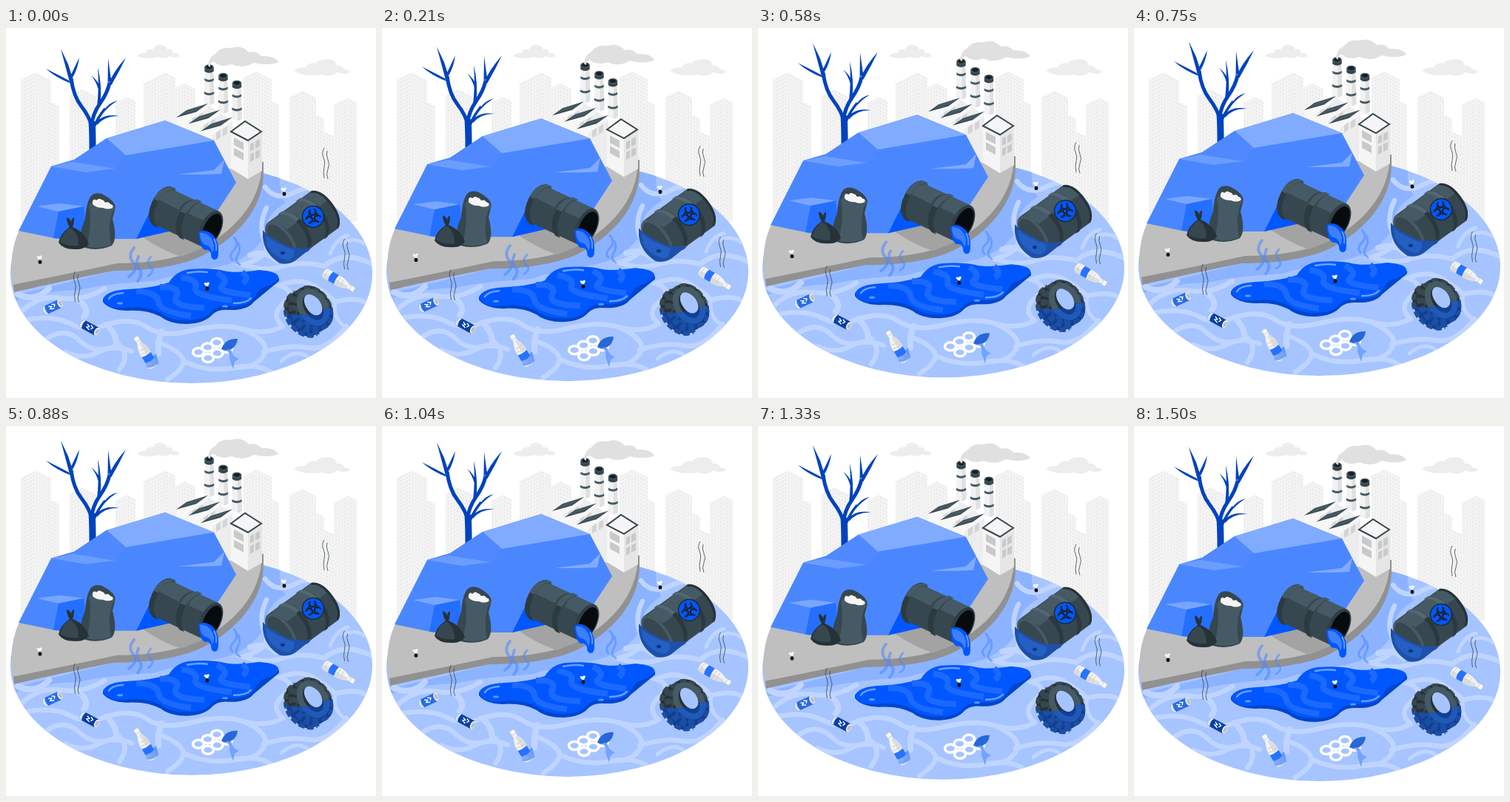
Write an HTML page that moves like this. It is 500 px wide and 500 px high and loops after 1.54 s.

```html
<!DOCTYPE html>
<html lang="en">
<head>
<meta charset="utf-8">
<title>Polluted shore</title>
<style>
html, body { margin: 0; width: 100%; height: 100%; overflow: hidden; background: #fff; }
svg { display: block; width: 100%; height: 100%; }
</style>
</head>
<body>
<svg viewBox="0 0 500 500" xmlns="http://www.w3.org/2000/svg">
<defs>
  <clipPath id="pond"><ellipse cx="250.5" cy="332" rx="244.5" ry="148"/></clipPath>
  <clipPath id="dip"><path d="M365 382Q395 392 415 385T450 376V430H365Z"/></clipPath>
  <pattern id="winL" width="4" height="5" patternUnits="userSpaceOnUse" patternTransform="skewY(-27)">
    <rect width="4" height="5" fill="#f5f5f5"/><rect x=".7" y="1" width="2.4" height="3" fill="#ebebeb"/>
  </pattern>
  <pattern id="winR" width="4" height="5" patternUnits="userSpaceOnUse" patternTransform="skewY(27)">
    <rect width="4" height="5" fill="#f5f5f5"/><rect x=".7" y="1" width="2.4" height="3" fill="#ebebeb"/>
  </pattern>
  <g id="fly">
    <ellipse cx="-3" cy="-2" rx="3.4" ry="1.7" transform="rotate(35)" fill="#f5f5f5"/>
    <ellipse cx="2.6" cy="-3" rx="3.2" ry="1.7" transform="rotate(-40)" fill="#f5f5f5"/>
    <ellipse cy="2.2" rx="2.4" ry="2.6" fill="#111"/>
  </g>
  <g id="bottle">
    <path d="M-20-7Q-24-7-24 0T-20 7H2Q10 6 14 3H21V-3H14Q10-6 2-7Z" fill="#f2f2f2"/>
    <path d="M-20 7H2Q10 6 14 3V0H-23Q-23 7-20 7Z" fill="#dedede"/>
    <path d="M-13-7H-4Q-6 0-4 7H-13Q-16 0-13-7Z" fill="#2672ff"/>
    <path d="M-19-6Q-22 0-19 6M0-6Q-2 0 0 6M5-5Q3 0 5 5" fill="none" stroke="#c8c8c8" stroke-width=".8"/>
    <rect x="18" y="-3.5" width="6" height="7" rx="1.5" fill="#fafafa" stroke="#c4c4c4" stroke-width=".8"/>
  </g>
  <g id="can">
    <path d="M-11-6H11Q14-4 14 0T11 6H-11Q-14 4-14 0T-11-6Z"/>
    <path d="M-9-6H-11Q-14-4-14 0T-11 6H-9Q-12 0-9-6Z" fill="#dce6fa"/>
    <ellipse cx="11" rx="3.2" ry="5.8" fill="#eee"/><ellipse cx="11.4" rx="2" ry="4" fill="#bdbdbd"/>
    <path d="M-5-3L-1-1L-4 1L1 3M0-4L4-2L2 1" fill="none" stroke="#fff" stroke-width="1.4"/>
  </g>
  <path id="wisp" d="M-2-21Q-6-14-3-8T-2 5T-2 20M2-17Q0-11 3-5T3 8T3 21" fill="none" stroke="#37474f" stroke-width=".8"/>
  <g id="stack">
    <path d="M-5.5 3H5.5L7 48Q0 53-7 48Z" fill="#f2f2f2"/>
    <path d="M1 3H5.5L7 48Q4 51 1 51Z" fill="#e0e0e0"/>
    <path d="M-6.2 15Q0 19 6.2 15V18Q0 22-6.2 18ZM-6.7 33Q0 37 6.7 33V36Q0 40-6.7 36Z" fill="#455a64"/>
    <path d="M-6.2 0V5.500Q0 10 6.2 5.500V0Z" fill="#37474f"/>
    <ellipse rx="6.2" ry="3.8" fill="#455a64"/><ellipse rx="4.3" ry="2.4" fill="#172026"/>
  </g>
  <g id="shed">
    <path d="M0 20L13 10L42 2V36L16 45L0 35Z" fill="#f7f7f7"/>
    <path d="M16 25L42 8V44L16 52Z" fill="#ededed"/>
    <path d="M0 20L14 10L43 1L27 12.500Z" fill="#37474f"/>
    <path d="M4 17.500L15 10.500L39 3L27 11Z" fill="#455a64"/>
    <path d="M21 22l6-4v10l-6 4zM30 17l6-4v10l-6 4z" fill="#d4d4d4"/>
  </g>
</defs>

<g id="city"></g>
<g fill="#ededed">
  <path d="M177 38Q181 33 188 34Q190 28 198 29Q203 21 210 23Q217 24 218 29Q225 28 226 34Q232 33 235 38Q228 41 222 38Q214 43 205 39Q192 44 177 38Z"/>
  <path d="M389 58Q397 52 405 54Q408 46 418 48Q426 41 436 42Q446 43 447 51Q455 50 457 56Q463 56 465 60Q458 64 447 60Q440 67 426 63Q402 66 389 58Z"/>
</g>

<g id="isle">
  <ellipse cx="250.5" cy="332" rx="244.5" ry="148" fill="#a6c4ff"/>
  <g clip-path="url(#pond)">
    <path d="M0 364Q80 345 146 328Q220 328 265 308Q345 262 348 190H372Q366 222 378 236Q348 254 352 277Q333 312 290 322Q240 330 200 342Q130 346 100 354Q55 354 0 372Z" fill="#8cb3ff"/>
    <g fill="none" stroke="#bfd5ff" stroke-width="6.500" stroke-linecap="round">
      <path d="M350 215Q365 235 390 222T442 225M352 243Q340 268 350 288T320 320Q350 330 374 322T430 322Q455 300 493 318"/>
      <path d="M20 384Q45 360 75 365T133 352M30 394Q65 388 88 400T135 401Q170 390 190 404T246 410Q290 398 320 407T374 403"/>
      <path d="M55 420Q80 403 100 423T153 428Q168 443 153 462M80 438Q105 449 125 438T170 437M205 425Q230 433 238 445T218 475M244 452Q275 466 310 459T364 470"/>
      <path d="M320 407Q360 425 348 443T310 458M348 438Q382 427 408 432T460 403M374 403Q356 388 375 372T370 348Q396 337 415 348T445 370Q478 362 490 374"/>
      <path d="M412 448Q394 431 372 450M445 370Q440 395 463 406M455 290Q472 282 485 292M438 305Q445 285 462 280" stroke-width="5"/>
      <path d="M95 365Q115 380 105 391M16 360Q40 371 58 352M210 410Q205 424 206 440M135 401Q150 413 149 430M330 307Q352 300 365 314" stroke-width="8"/>
    </g>
  </g>

  <path d="M7 320L11 357Q80 341 146 328C190 328 232 323 265 308C310 285 348 245 348 195V181L320 180Z" fill="#919191"/>
  <path d="M18 273Q3 305 9 347Q90 331 150 318C190 318 228 313 260 299C305 277 346 237 346 181L300 150L80 200Z" fill="#bfbfbf"/>
  <path d="M185 283Q210 300 236 309L262 299L280 285L230 265Z" fill="#a3a3a3"/>

  <use href="#stack" x="274.500" y="53"/>
  <use href="#stack" x="293.500" y="64.500"/>
  <use href="#stack" x="312" y="74.500"/>
  <path d="M273 51Q274 39 283 35Q290 25 304 27Q319 22 328 33Q338 30 345 38Q363 37 368 46Q354 52 335 47Q320 56 305 49Q290 54 281 46Q275 46 276 53Z" fill="#e0e0e0"/>
  <path d="M232 123L270 102L306 126V190H280Z" fill="#ededed"/>
  <use href="#shed" x="230" y="101"/>
  <use href="#shed" x="246.500" y="109.500"/>
  <use href="#shed" x="263" y="119.500"/>
  <path d="M304 141L327 153V204L304 190Z" fill="#f5f5f5"/>
  <path d="M327 153L346 141V193L327 204Z" fill="#e6e6e6"/>
  <path d="M304 140L323 126L345 140L327 152Z" fill="#f5f5f5" stroke="#37474f" stroke-width="2"/>
  <path d="M308 148l13 7v10l-13-7zM308 162l13 7v10l-13-7zM330 157l5-3v10l-5 3zM337 153l6-3v10l-6 3zM330 171l5-3v10l-5 3zM337 167l6-3v10l-6 3z" fill="#c9c9c9"/>

  <g fill="none" stroke="#0043bd" stroke-linejoin="bevel">
    <path d="M117 165Q117 142 116 126" stroke-width="9"/>
    <path d="M117 136Q113 120 102 106T88 68" stroke-width="5"/>
    <path d="M115 134Q117 116 127 102T140 74" stroke-width="5"/>
    <path d="M119 134Q124 121 134 109" stroke-width="3.500"/>
  </g>
  <path d="M86 73L74 28L84 49L91 71ZM89 73Q72 64 54 55Q67 67 88 75ZM88 63L99 40Q97 55 90 67ZM137.500 78Q144 60 162 40Q153 59 142.500 77ZM137.500 74L138 41L142 70ZM123 106Q126 80 124 53Q130 78 127.500 102ZM125 84Q122 72 115 64Q124 71 127 80ZM132 112Q138 101 151 98Q141 104 135 111ZM121 128Q132 115 153 119Q134 118 123 131Z" fill="#0043bd"/>

  <path d="M17 274L61 187L92 178L136 149L215 125L281 152L311 209L286 247L240 270L176 285L70 285Z" fill="#4a87ff"/>
  <path d="M61 187L92 178L136 149L162 172L147 191Z" fill="#5089ff"/>
  <path d="M136 149L215 125L281 152L162 172Z" fill="#80abff"/>
  <path d="M61 187L90 181L147 190L131 192L108 195Z" fill="#6b9dff"/>
  <path d="M42 241L72 237L105 241L71 248Z" fill="#78a6ff"/>
  <path d="M64 284L71 248L105 241L110 285Z" fill="#246fff"/>
  <path d="M233 198L281 192L295 178L291 197L268 198Z" fill="#80abff"/>
  <path d="M176 285L202 233L242 270Z" fill="#0057ff"/>

  <path d="M113 230Q117 221 129 224Q146 232 148 242L144 258Q151 285 143 294Q125 302 107 297Q95 285 107 258Q108 240 113 230Z" fill="#37474f"/>
  <path d="M119 231Q140 236 148 242L143 250Q137 272 142 293Q125 300 109 295Q117 260 112 240Z" fill="#455a64"/>
  <path d="M117 234Q119 230 122 233Q126 229 129 232Q132 232 134 236Q139 234 141 238Q146 239 144 243Q138 246 131 243Q121 243 117 238Z" fill="#f5f5f5"/>
  <path d="M82 256Q88 258 88 263Q88 258 92 256Q92 264 90 269Q107 276 112 292Q106 300 92 299Q77 299 71 290Q73 278 86 269Q82 263 82 256Z" fill="#263238"/>
  <path d="M85 271Q76 278 73 289Q84 296 98 294Q99 280 89 271Z" fill="#37474f"/>

  <g transform="translate(244 256) rotate(25)">
    <ellipse cx="-35" rx="16" ry="29" fill="#37474f"/>
    <path d="M36-26H-32V27H36Z" fill="#37474f"/>
    <path d="M-32-26H-2Q-13-20-14-5L-46-6Q-43-22-32-26ZM8-26H34L24-6H0Q0-20 8-26Z" fill="#455a64"/>
    <path d="M-35-29Q-51-25-51 0T-35 29H-29Q-44 22-44 0T-29-29Z" fill="#2d3a41"/>
    <path d="M3-28Q-11-22-11 0T3 29H10Q-3 20-3 0T10-28Z" fill="#2d3a41"/>
    <path d="M3-28Q-10-22-11-4H-3Q-1-22 10-28ZM-35-29Q-49-25-51-4H-44Q-42-24-29-29Z" fill="#455a64"/>
    <ellipse cx="36" rx="14" ry="26" fill="#2f3e46"/>
    <ellipse cx="37.500" rx="11" ry="22.500" fill="#080b0d"/>
  </g>
  <path d="M260 276Q270 270 281 281Q288 289 287 304Q287 313 282 313Q277 313 277 305Q275 299 269 300Q261 297 260 276Z" fill="#0057ff"/>
  <path d="M262 277Q272 275 279 287Q283 295 279 304Q276 293 269 293Q262 289 262 277Z" fill="#3d7fff"/>
  <path d="M281 285Q285 291 284 301" fill="none" stroke="#7aa8ff" stroke-width="1.500"/>

  <path d="M131 366V370Q139 381 163 382Q190 380 209 390Q221 400 245 400Q269 399 279 387Q287 380 300 381Q326 382 335 370L369 342V338Z" fill="#0045cc"/>
  <path d="M131 366Q137 354 166 353T220 344Q230 328 248 326Q278 324 294 328T342 327Q371 329 368 339Q362 347 346 351Q341 354 337 362Q331 376 306 376Q287 374 278 383Q269 395 245 395Q221 395 209 385Q190 375 163 378T131 366Z" fill="#0057ff"/>
  <g fill="none" stroke="#1c69ff" stroke-width="8">
    <path d="M176 356Q204 356 206 370T250 389M208 350Q237 349 230 363T268 378M237 337Q260 340 256 351T305 368M285 331Q302 340 292 348T330 361M319 330Q330 338 320 345"/>
  </g>
  <path d="M139 366Q143 359 158 358M245 331Q260 328 272 330M308 372Q325 372 331 365" fill="none" stroke="#6aa0ff" stroke-width="2.500" stroke-linecap="round"/>
  <ellipse cx="154" cy="372" rx="4" ry="1.700" fill="#5c96ff"/><ellipse cx="296" cy="376" rx="4" ry="1.500" fill="#5c96ff"/>

  <g transform="translate(401 267) rotate(-36)">
    <path d="M-36-31H36Q50-25 50 0T36 31H-36Z" fill="#37474f"/>
    <path d="M-30-30H34Q46-26 48-8H-20Z" fill="#455a64"/>
    <path d="M12-32Q27-24 27 0T12 32H18Q33 24 33 0T18-32ZM-18-32Q-3-24-3 0T-18 32H-12Q3 24 3 0T-12-32Z" fill="#2b383f"/>
    <path d="M12-32Q23-26 26-10H32Q29-26 18-32ZM-18-32Q-7-26-4-10H2Q-1-26-12-32Z" fill="#526771"/>
    <path d="M36-30Q48-24 48 0T36 30" fill="none" stroke="#263238" stroke-width="3"/>
    <ellipse cx="-36" rx="15" ry="31" fill="#455a64"/>
    <ellipse cx="-37" rx="12" ry="27" fill="#37474f"/>
  </g>
  <path d="M347 273Q352 280 368 288Q388 302 414 296L394 312Q384 321 370 318Q349 305 347 283Z" fill="#1d50a8"/>
  <path d="M351 280Q364 292 389 300Q391 311 381 314Q363 311 353 294Z" fill="#245fc4"/>
  <ellipse cx="374" cy="304" rx="3" ry="2.200" fill="#0c357d"/>
  <g transform="translate(415 255) rotate(-8)">
    <circle r="14.500" fill="#0057ff" stroke="#1d2b32" stroke-width="1.500"/>
    <g id="hazard" transform="scale(.9)" fill="none" stroke="#152127" stroke-width="2.500"></g>
    <circle r="1.500" fill="#0057ff"/>
  </g>

  <g id="tire"></g>

  <use href="#bottle" transform="translate(450 342) rotate(30)"/>
  <use href="#bottle" transform="translate(187.500 438) rotate(-121)"/>
  <path d="M186 447Q193 449 203 440L206 453Q199 460 191 459Z" fill="#2672ff" opacity=".55"/>
  <use href="#can" transform="translate(63 377) rotate(-25)" fill="#286be6"/>
  <use href="#can" transform="translate(113 405) rotate(28)" fill="#0840a5"/>

  <g id="rings" fill="none" stroke="#fff" stroke-width="3.500"></g>
  <path d="M291 434Q296 419 313 420Q312 431 302 435Q296 437 291 434Z" fill="#2867d8"/>
  <path d="M297 435Q304 439 302 447L307 461L309 451L315 447Q306 445 304 434Z" fill="#72a3ff"/>

  <g fill="none" stroke="#4d88ff" stroke-linecap="round" opacity=".55">
    <path d="M173 297Q164 308 172 317T166 336M179 309Q174 320 180 326T178 342" stroke-width="4"/>
    <path d="M196 309Q188 317 195 323T192 335M308 283Q316 292 308 300T306 313M314 291Q318 299 313 307T316 320" stroke-width="3"/>
  </g>
  <use href="#wisp" x="95.500" y="350"/>
  <use href="#wisp" x="432" y="183"/>
  <use href="#wisp" x="459.500" y="306"/>
  <use href="#fly" x="46" y="314"/>
  <use href="#fly" x="376" y="222"/>
  <use href="#fly" x="272" y="350"/>
</g>
</svg>
<script>
const el = id => document.getElementById(id);

// left, ridge and right x, ridge y
const towers = [
  [55, 61, 72, 100], [20, 40, 61, 60], [86, 103, 122, 83], [148, 164, 175, 93],
  [229, 241, 256, 75], [186, 215, 229, 60], [350, 359, 369, 99], [321, 338, 359, 59],
  [425, 430, 443, 140], [412, 419, 430, 117], [383, 400, 419, 85], [443, 462, 474, 94]
];
const base = 262;
el("city").innerHTML = towers.map(([l, m, r, y]) =>
  `<path d="M${l} ${y + (m - l) / 2}L${m} ${y}V${base}H${l}Z" fill="url(#winL)"/>
   <path d="M${m} ${y}L${r} ${y + (r - m) / 2}V${base}H${m}Z" fill="url(#winR)"/>`).join("");

el("hazard").innerHTML = [0, 120, 240].map(a =>
  `<g transform="rotate(${a})"><path d="M-3-11A4.800 4.800 0 1 0 3-11M0-2V-4"/>
   <path d="M-4.500 5.500A7 7 0 0 0 4.500 5.500" stroke-width="1.500"/></g>`).join("");

const tire = (dark, mid, tread) => `<g transform="translate(408 383) rotate(-32)">
  <path fill-rule="evenodd" fill="${dark}" d="M8-32C26-32 32-14 32 1S25 32 8 32H-7C-22 32-29 16-29 0S-22-32-7-32Z
    M11-20C4-20 1-12 1-4S4 12 11 12S21 4 21-4S18-20 11-20Z"/>
  <path d="M-6-31C-20-30-29-14-29 0S-20 31-6 32" fill="none" stroke="${tread}" stroke-width="6" stroke-dasharray="8 4"/>
  <path d="M0-29C-11-28-19-14-19 0S-11 29 0 30" fill="none" stroke="${tread}" stroke-width="9" stroke-dasharray="8 4" stroke-dashoffset="6"/>
  <ellipse cx="9" cy="0" rx="21.500" ry="30" fill="none" stroke="${tread}" stroke-width="5" stroke-dasharray="9 3.500"/>
  <ellipse cx="9" cy="-1" rx="16" ry="23" fill="none" stroke="${mid}" stroke-width="8"/>
</g>`;
el("tire").innerHTML = tire("#263238", "#455a64", "#37474f") +
  `<g clip-path="url(#dip)">${tire("#123f8f", "#2159b8", "#1b4ea6")}</g>`;

el("rings").innerHTML = [0, 1, 2, 3, 4, 5].map(i => {
  const col = i % 3, row = i > 2;
  return `<ellipse cx="${260 + col * 12.5 + row * 13}" cy="${438 - col * 6.5 + row * 8}" rx="7.500" ry="5.500"/>`;
}).join("");

const loop = 1540, cycle = 1500, lift = 10;
const isle = el("isle");

// steady rise and fall, then a short rest
function draw(now) {
  const t = Math.min(now % loop, cycle);
  const y = -lift * (1 - Math.abs(2 * t / cycle - 1));
  isle.setAttribute("transform", `translate(0 ${y.toFixed(3)})`);
}

const start = performance.now();
function tick() {
  draw(performance.now() - start);
  requestAnimationFrame(tick);
}
tick();
</script>
</body>
</html>
```
